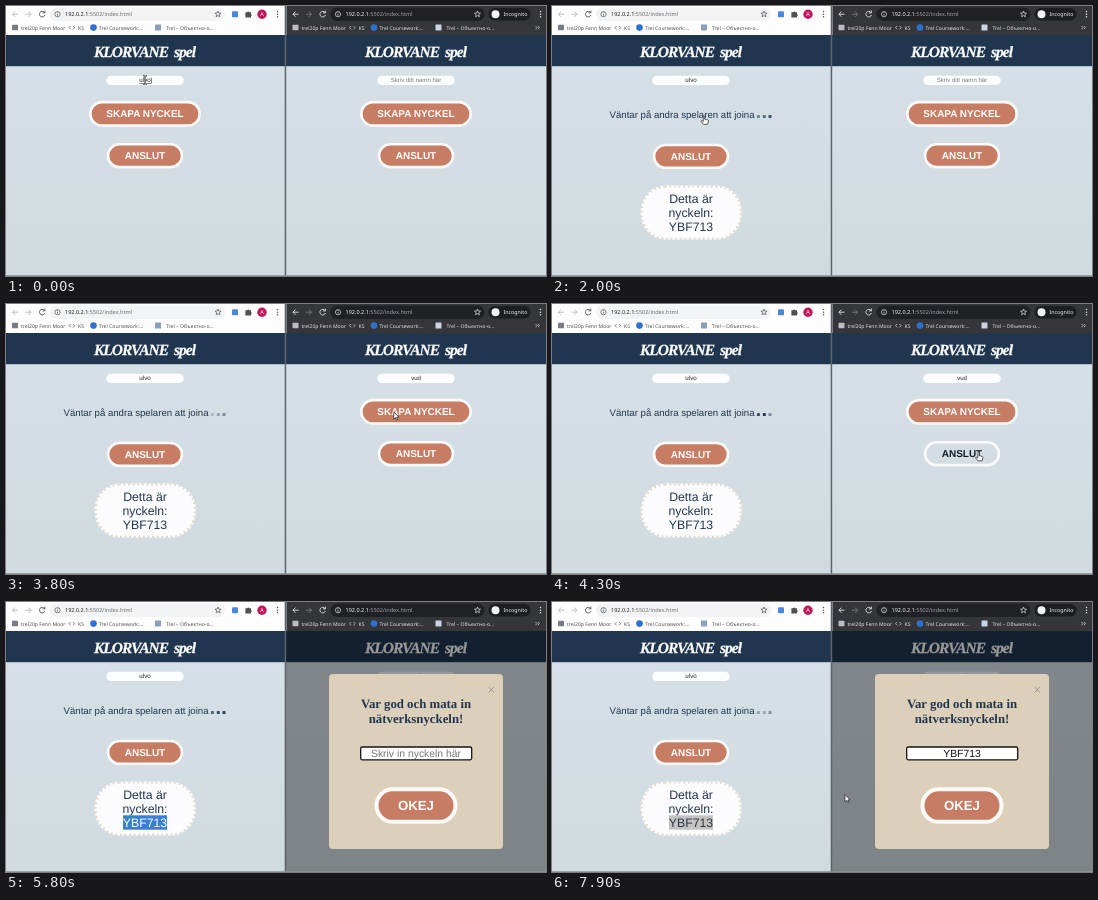
An HTML page that plays this animation: 540 px wide and 270 px high, repeating every 8000 ms.

```html
<!DOCTYPE html>
<html lang="sv">
<head>
<meta charset="utf-8">
<title>Ordspel</title>
<style>
html, body { margin: 0; width: 100%; height: 100%; overflow: hidden; background: #d3dde3; }
svg { display: block; width: 100%; height: 100%; }
text { font-family: "Liberation Sans", Arial, sans-serif; white-space: pre; text-rendering: geometricPrecision; }
.ui { font-family: "Noto Sans", "Open Sans", sans-serif; }
.serif { font-family: "Liberation Serif", Times, serif; font-weight: bold; }
.logo { font-family: "Liberation Serif", Times, serif; font-weight: bold; font-style: italic; letter-spacing: -1px; }
.mid { text-anchor: middle; }
.bold { font-weight: bold; }
</style>
</head>
<body>
<svg id="stage" viewBox="0 0 540 270" xmlns="http://www.w3.org/2000/svg"></svg>
<script>
const LOOP = 8000;
const NAVY = '#20364f', CLAY = '#c77d63', INK = [22, 28, 36], WHITE = [255, 255, 255];
const HOST_NAME = 'ulvo', GUEST_NAME = 'vud', KEY = 'YBF713';
const SUGGESTIONS = ['vuddi', 'vud', 'onke', 'ulvo', 'onke2', 'vud2'];

const rect = (x, y, w, h, r, fill, more = '') =>
  `<rect x="${x}" y="${y}" width="${w}" height="${h}" rx="${r}" fill="${fill}" ${more}/>`;
const circle = (x, y, r, fill, more = '') =>
  `<circle cx="${x}" cy="${y}" r="${r}" fill="${fill}" ${more}/>`;
const text = (x, y, size, fill, str, cls = '', more = '') =>
  `<text x="${x}" y="${y}" font-size="${size}" fill="${fill}" class="${cls}" ${more}>${str}</text>`;
const line = (d, stroke, w = 0.9, more = '') =>
  `<path d="${d}" fill="none" stroke="${stroke}" stroke-width="${w}" ${more}/>`;
const group = (id, inner) => `<g id="${id}">${inner}</g>`;

function star(x, y, stroke) {
  const pts = [];
  for (let i = 0; i < 10; i++) {
    const a = i * Math.PI / 5 - Math.PI / 2, r = i % 2 ? 1.4 : 3.2;
    pts.push((x + r * Math.cos(a)).toFixed(2) + ' ' + (y + r * Math.sin(a)).toFixed(2));
  }
  return line('M' + pts.join('L') + 'Z', stroke, 0.7);
}

function browserBar(x, dark) {
  const fg = dark ? '#e3e5e8' : '#4d5156';
  const label = dark ? '#e0e2e5' : '#4a4e53';
  const end = dark ? 198 : 219;
  const marks = (s, px) => text(px, 23.6, 5.1, label, s, 'ui');
  let out = rect(0, 0, dark ? 260 : 279, 30, 0, dark ? '#35363a' : '#fdfdfe');
  out += rect(44, 1.5, end - 44, 13.5, 6.7, dark ? '#202124' : '#f1f3f4');
  out += line('M12 8.2H6.5M9 5.6L6.4 8.2L9 10.8', dark ? fg : '#b6b9bd');
  out += line('M19.5 8.2H25M22.5 5.6L25.1 8.2L22.5 10.8', dark ? '#77797d' : '#b6b9bd');
  out += line('M38.4 6.4A2.8 2.8 0 1 0 38.9 9M38.9 4.6V6.9H36.5', fg);
  out += circle(51.5, 8.2, 2.6, 'none', `stroke="${fg}" stroke-width=".7"`) + line('M51.5 7.7V9.7M51.5 6.4V7', fg, 0.7);
  out += text(59, 10.3, 5.5, dark ? '#f1f3f4' : '#202124',
    `192.0.2.1<tspan fill="${dark ? '#9aa0a6' : '#6b7076'}">:5502/index.html</tspan>`, 'ui');
  out += star(dark ? 191 : 212, 8.2, fg);
  const menuX = dark ? 254 : 271.5;
  for (const y of [5.6, 8.2, 10.8]) out += circle(menuX, y, 0.75, fg);
  if (dark) {
    out += rect(202, 2, 42, 12.5, 6.2, '#1d1e21') + circle(209, 8.2, 4, '#f1f3f4');
    out += text(217, 10.2, 5.3, '#f1f3f4', 'Incognito', 'ui');
    out += line('M249 20L250.5 21.6L249 23.2M251.4 20L252.9 21.6L251.4 23.2', fg, 0.7);
  }
  out += rect(6, 18.8, 6, 5.4, 0.6, dark ? '#b9bcc0' : '#777c82') + marks('trel20p Fenn Moor', 15);
  out += line('M64.6 20L63 21.7L64.6 23.4M67 20L68.6 21.7L67 23.4', label, 0.7) + marks('KS', 72);
  out += circle(87.5, 21.6, 3.3, '#2f6fd0') + marks('Trel Coursework:...', 93);
  out += rect(149, 18.6, 6, 6, 0.5, dark ? '#c9d5e4' : '#8aa0b8') + marks('Trel – Объектно-о...', 160);
  return `<g transform="translate(${x} 0)">${out}</g>`;
}

const logo = cx =>
  text(cx - 51, 50.5, 15.5, '#fff', 'KLORVANE', 'logo', 'stroke="#fff" stroke-width=".25"') +
  text(cx + 29, 50.5, 15.5, '#fff', 'spel', 'logo', 'stroke="#fff" stroke-width=".25"');

function button(id, cx, cy, w, h, border, size, str) {
  const b = border / 2;
  return group(id,
    rect(cx - w / 2 + b, cy - h / 2 + b, w - border, h - border, (h - border) / 2, CLAY,
      `stroke="#fbfaf9" stroke-width="${border}"`) +
    text(cx, cy + size * 0.358, size, '#fff', str, 'mid bold'));
}

function page(side, left, width, cx) {
  return rect(left, 29, width, 241, 0, 'url(#page)') +
    rect(left, 29, width, 31.2, 0, NAVY) + logo(cx) +
    rect(cx - 38.7, 69.8, 77.4, 9.2, 4.6, '#fcfdfe') +
    button(side + 'Create', cx, 107.8, 112, 26, 2.6, 9.95, 'SKAPA NYCKEL') +
    button(side + 'Join', cx, 149.7, 76.5, 25.4, 2.6, 9.95, 'ANSLUT');
}

function waiting() {
  let out = text(57.5, 112, 9.65, NAVY, 'Väntar på andra spelaren att joina');
  [204.9, 210.8, 216.5].forEach((x, i) => out += rect(x, 109.1, 3, 3, 0.6, NAVY, `id="dot${i}"`));
  out += rect(88.8, 179.6, 100.8, 54, 25, '#fcfcfe');
  out += rect(89.8, 180.6, 98.8, 52, 24, 'none',
    'stroke="#e2d8c8" stroke-width="2.2" stroke-dasharray="0 4.6" stroke-linecap="round"');
  out += text(139, 196.7, 12.25, NAVY, 'Detta är', 'mid') + text(139, 210.6, 12.25, NAVY, 'nyckeln:', 'mid');
  out += rect(117, 213.3, 44, 14.4, 0, '#3b7fd4', 'id="mark"');
  out += text(139, 224.6, 12.25, NAVY, KEY, 'mid', 'id="key"');
  return group('wait', out);
}

function dropdown() {
  let out = rect(371.4, 79.6, 82.2, 99.2, 2, '#000', 'opacity=".2"') + rect(372, 79, 81, 98.6, 1.5, '#fcfbfc');
  out += rect(372, 98, 81, 15.3, 0, '#e8eaee', 'id="row"');
  SUGGESTIONS.forEach((s, i) =>
    out += text(376.8, 92.1 + i * 15.3, 5.6, '#26292d', s, 'ui', 'font-weight="500"'));
  return group('list', out);
}

function modal() {
  const out = rect(280, 29, 260, 241, 0, '#000', 'opacity=".4"') +
    rect(323, 72, 174, 175, 4, '#ddd0bb') +
    line('M482.6 85L488 90.4M488 85L482.6 90.4', '#98938b', 0.9) +
    text(410, 106.2, 12.8, NAVY, 'Var god och mata in', 'serif mid') +
    text(410, 120.9, 12.8, NAVY, 'nätverksnyckeln!', 'serif mid') +
    rect(354.7, 145, 111, 12.8, 1.5, '#fff', 'stroke="#151515" stroke-width="1.3"') +
    text(410, 155, 10.4, '#757575', '', 'mid', 'id="code"') +
    button('ok', 410, 203.6, 83, 36.5, 4, 13.2, 'OKEJ');
  return group('modal', out);
}

const outline = 'stroke="#222" stroke-width=".7" stroke-linejoin="round"';
const beam = 'M-2 -4.2H-.6L0 -3.6L.6 -4.2H2M0 -3.6V3.6M-2 4.2H-.6L0 3.6L.6 4.2H2';
const pointers = {
  beam: line(beam, '#fff', 1.8, 'opacity=".6"') + line(beam, '#111', 0.9),
  arrow: `<path d="M0 0V7.2L1.7 5.7L2.8 8.2L3.9 7.7L2.8 5.3H5Z" fill="#fff" ${outline}/>`,
  hand: `<path d="M-.7 0Q0 -.8 .7 0V3.2L3.8 3.9Q4.6 4.2 4.4 5.2L3.7 8.3H-.6L-3 5.2Q-2.8 4.1 -1.7 4.7L-.7 5.6Z" fill="#fff" ${outline}/>`
};

const stage = document.getElementById('stage');
stage.innerHTML = `<defs>
  <linearGradient id="page" x2="0" y2="1"><stop stop-color="#d6e0e7"/><stop offset="1" stop-color="#d0dbe0"/></linearGradient>
  </defs>` +
  browserBar(0, false) +
  rect(226, 5.2, 6, 6, 1, '#4a86e0') +
  `<path d="M239.4 6.2H241.2A1.2 1.2 0 0 1 243.4 6.2H245V8A1.2 1.2 0 0 1 245 10.2V11.6H239.4Z" fill="#4d5156"/>` +
  circle(256, 8.2, 4.7, '#c2185b') + text(256, 10.1, 5.4, '#fff', 'A', 'mid ui') +
  page('host', 0, 279, 139) + text(139, 76.4, 6.2, '#222', HOST_NAME, 'mid') +
  group('editing', line('M133.4 77.5H144.8', '#333', 0.6) + line('M145.4 71.6V77.6', '#222', 0.6)) +
  waiting() +
  browserBar(280.5, true) +
  page('guest', 280, 260, 410) +
  text(410, 76.4, 6.05, '#777', '', 'mid', 'id="guestName"') +
  line('M410.4 71.4V77.6', '#222', 0.6, 'id="caret"') +
  dropdown() + modal() +
  rect(278.7, 0, 1.5, 270, 0, '#5d646b') +
  rect(0, 269.2, 540, 0.8, 0, '#8b9298') +
  Object.keys(pointers).map(k => group(k, pointers[k])).join('');

const $ = id => document.getElementById(id);
const show = (id, on) => $(id).setAttribute('visibility', on ? 'visible' : 'hidden');
const clamp = v => Math.max(0, Math.min(1, v));
const ease = u => u * u * (3 - 2 * u);

// time, x, y
const path = [
  [0, 139, 74], [400, 139, 74], [1000, 152, 110], [2000, 152, 110], [2500, 415.5, 74.5],
  [2750, 415.5, 74.5], [3250, 386, 106], [3750, 386, 106], [4150, 426.5, 148.5], [4650, 426.5, 148.5],
  [5300, 152, 221], [5850, 152, 221], [6180, 412, 152], [6350, 412, 152], [6600, 411, 205],
  [7050, 411, 205], [7600, 293, 192.6], [LOOP, 293, 192.6]
];
const kinds = [
  [0, 'beam'], [500, 'arrow'], [900, 'hand'], [2050, 'arrow'], [2400, 'beam'], [2900, 'arrow'],
  [4000, 'hand'], [4650, 'arrow'], [5200, 'beam'], [5400, ''], [5900, 'arrow'], [6150, 'beam'],
  [6400, 'arrow'], [6480, 'hand'], [7150, 'arrow']
];

function movePointer(t) {
  const i = path.findIndex(p => p[0] > t);
  const [t0, x0, y0] = path[i - 1], [t1, x1, y1] = path[i];
  const u = ease((t - t0) / (t1 - t0));
  const kind = kinds.filter(k => k[0] <= t).pop()[1];
  for (const k in pointers) show(k, k === kind);
  if (kind) $(kind).setAttribute('transform', `translate(${x0 + (x1 - x0) * u} ${y0 + (y1 - y0) * u})`);
}

function hover(id, t, from, to) {
  const u = clamp((t - from) / 400) * (1 - clamp((t - to) / 400));
  const [shape, label] = $(id).children;
  shape.setAttribute('fill-opacity', 1 - u);
  label.setAttribute('fill', `rgb(${WHITE.map((c, i) => Math.round(c + (INK[i] - c) * u))})`);
}

function blinkDots(t) {
  for (let i = 0; i < 3; i++) {
    const p = ((t - 2450 - i * 200 + 2700) % 1350) / 1350;
    $('dot' + i).setAttribute('opacity', p < 0.2 ? 0.2 + p * 4 : 1 - (p - 0.2));
  }
}

function draw(t) {
  const started = t >= 1900, pasted = t >= 6280, named = t >= 3350;
  show('editing', !started);
  show('wait', started);
  show('hostCreate', !started);
  // the waiting line is slightly taller than the button it replaces
  $('hostJoin').setAttribute('transform', `translate(0 ${started ? 0.7 : 0})`);
  blinkDots(t);
  hover('hostCreate', t, 1040, LOOP);

  const selected = t >= 5450, focused = t < 6150;
  $('mark').setAttribute('opacity', selected ? 1 : 0);
  $('mark').setAttribute('fill', focused ? '#3b7fd4' : '#c3c3c4');
  $('key').setAttribute('fill', selected ? (focused ? '#fff' : '#2c3440') : NAVY);

  $('guestName').textContent = named ? GUEST_NAME : 'Skriv ditt namn här';
  $('guestName').setAttribute('fill', named ? '#222' : '#777');
  show('caret', t >= 2600 && !named);
  show('list', t >= 2600 && !named);
  show('row', t >= 3100 && !named);
  hover('guestJoin', t, 3850, 4600);

  $('modal').setAttribute('opacity', clamp((t - 4500) / 200));
  $('code').textContent = pasted ? KEY : 'Skriv in nyckeln här';
  $('code').setAttribute('fill', pasted ? '#111' : '#757575');
  hover('ok', t, 6470, 7100);
  movePointer(t);
}

function tick() {
  draw(performance.now() % LOOP);
  requestAnimationFrame(tick);
}
tick();
</script>
</body>
</html>
```
